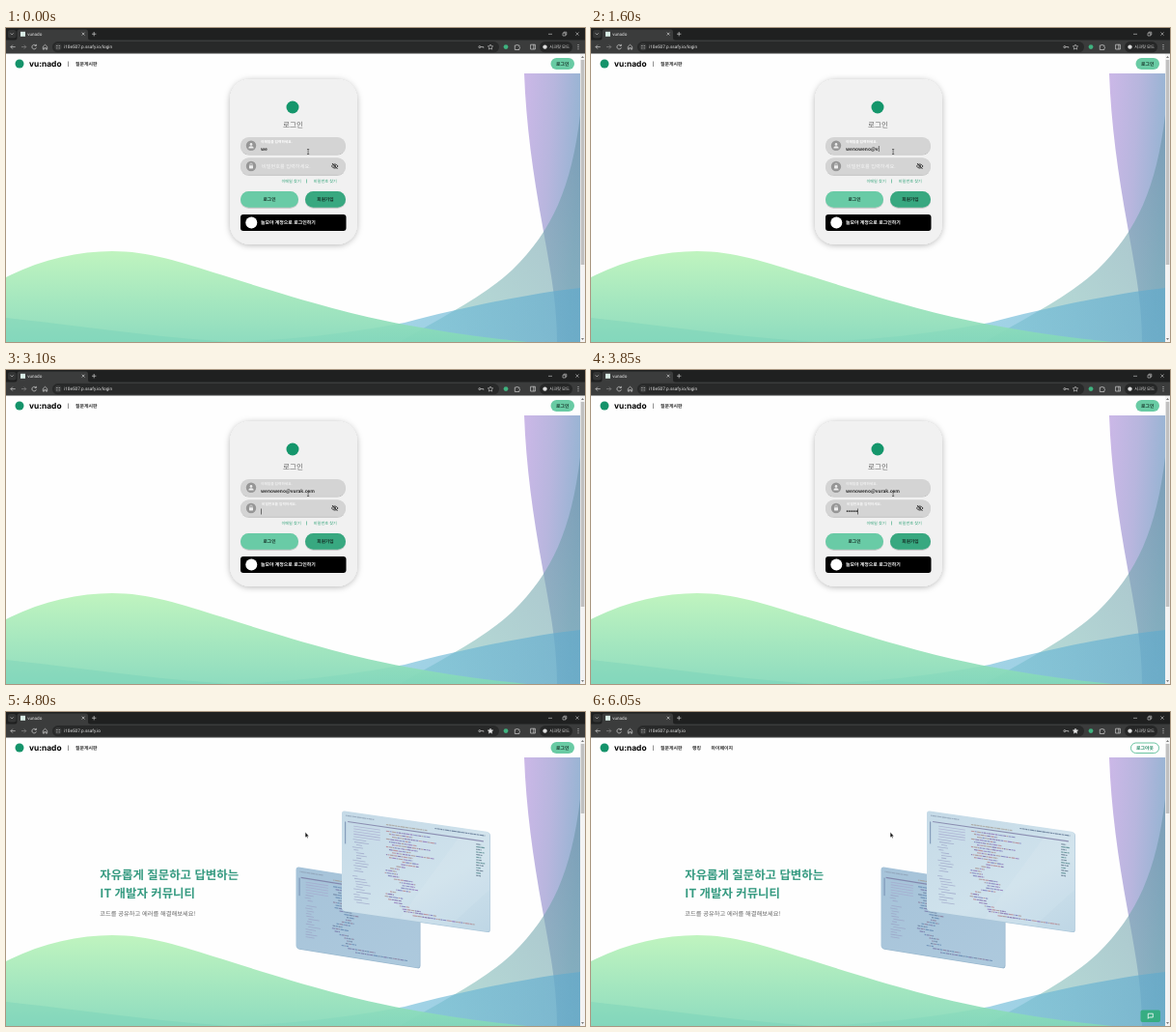
These frames come from a looping animation (600x325 px, 6.1 s). An HTML page:

```html
<!DOCTYPE html>
<html lang="ko">
<head>
<meta charset="utf-8">
<title>vunado</title>
<style>
html, body { margin: 0; width: 100%; height: 100%; overflow: hidden; background: #fefefe; }
svg { display: block; width: 600px; height: 325px; }
text { font-family: "Noto Sans CJK KR", "Noto Sans CJK JP", "Noto Sans CJK", "Noto Sans", sans-serif; text-rendering: geometricPrecision; white-space: pre; }
.b { font-weight: 700; }
.m { text-anchor: middle; }
.ui { font-family: Roboto, "Noto Sans CJK KR", "Noto Sans CJK JP", sans-serif; fill: #e6e6e6; }
.line { fill: none; stroke: #d0d0d0; stroke-width: .7; }
</style>
</head>
<body>
<svg viewBox="0 0 600 325">
  <defs>
    <linearGradient id="green" x2="0" y2="1"><stop stop-color="#b9f3b8"/><stop offset="1" stop-color="#82d8b8"/></linearGradient>
    <linearGradient id="purple" x2="1" y2=".3"><stop stop-color="#c9b4e6"/><stop offset=".5" stop-color="#b4b2dc"/><stop offset="1" stop-color="#8fb0d0"/></linearGradient>
    <linearGradient id="teal" x1="1" x2="0" y2="1"><stop stop-color="#6a8fa6"/><stop offset="1" stop-color="#8ccfc0"/></linearGradient>
    <linearGradient id="blue" x2="1" y2="0"><stop stop-color="#7fcfe6"/><stop offset="1" stop-color="#5fa9cc"/></linearGradient>
    <linearGradient id="glass" x2="1" y2="1"><stop stop-color="#c5dae7"/><stop offset=".6" stop-color="#cfe2ec"/><stop offset="1" stop-color="#bed6e5"/></linearGradient>
    <linearGradient id="glass2" x2="1" y2="1"><stop stop-color="#a6c3d9"/><stop offset="1" stop-color="#adc9dd"/></linearGradient>
    <filter id="shadow" x="-20%" y="-20%" width="140%" height="140%"><feDropShadow dx="0" dy="1" stdDeviation="3" flood-opacity=".28"/></filter>
    <filter id="soft" x="-10%" y="-30%" width="120%" height="180%"><feDropShadow dx="0" dy=".7" stdDeviation=".5" flood-opacity=".3"/></filter>
  </defs>

  <!-- page background -->
  <rect width="600" height="325" fill="#fefefe"/>
  <path d="M537 47H595V325H571C571 285 564 250 556 205C546 150 539 100 537 47Z" fill="url(#purple)" opacity=".95"/>
  <path d="M595 90C586 165 566 210 525 250C495 278 450 300 408 325H595Z" fill="url(#teal)" opacity=".6"/>
  <path d="M235 325C310 322 365 314 413 305C470 290 540 275 595 269V325Z" fill="url(#blue)" opacity=".65"/>
  <path d="M0 258C35 240 75 231 110 231C148 231 180 242 225 256C300 280 355 296 413 307C455 315 500 321 540 325H0Z" fill="url(#green)" opacity=".9"/>
  <path d="M0 300C70 307 150 320 235 325H0Z" fill="#6ccbb4" opacity=".3"/>

  <!-- site header -->
  <circle cx="14" cy="37" r="4.5" fill="#14936a"/>
  <text class="b" x="24" y="40" font-size="8.4" style="font-family:Inter,sans-serif">vu:nado</text>
  <path d="M64.5 34.5V40" stroke="#666" stroke-width=".7"/>
  <g class="b" font-size="4.9" fill="#2a2a2a">
    <text x="72" y="39.2">질문게시판</text>
    <g class="in"><text x="105" y="39.2">랭킹</text><text x="124.5" y="39.2">마이페이지</text></g>
  </g>
  <g class="out">
    <rect x="564.5" y="31" width="24.5" height="12" rx="6" fill="#69cba4"/>
    <text class="m b" x="576.7" y="39" font-size="4.8" fill="#17352a">로그인</text>
  </g>
  <g class="in">
    <rect x="559.5" y="32" width="29" height="10.5" rx="5.2" fill="#fff" stroke="#45b58a" stroke-width=".8"/>
    <text class="m b" x="574" y="39" font-size="4.9" fill="#258b66">로그아웃</text>
  </g>

  <!-- login page -->
  <g id="login">
    <rect x="232" y="53" width="132" height="171" rx="21" fill="#f1f1f1" filter="url(#shadow)"/>
    <circle cx="297" cy="82" r="6.5" fill="#14966b"/>
    <text class="m" x="297.5" y="102.8" font-size="7.6" fill="#666">로그인</text>
    <g fill="#d4d4d4" filter="url(#soft)">
      <rect x="243" y="113" width="109" height="17.5" rx="8.7"/>
      <rect x="243" y="134.3" width="109" height="17.5" rx="8.7"/>
    </g>
    <g fill="#969696"><circle cx="254" cy="121.8" r="5.2"/><circle cx="254" cy="143" r="5.2"/></g>
    <g fill="#eee">
      <circle cx="254" cy="120.4" r="1.3"/><path d="M251.3 124.4c0-2.8 5.4-2.8 5.4 0z"/>
      <rect x="252" y="142.2" width="4" height="3.2" rx=".4"/>
      <path d="M252.9 142v-1a1.1 1.1 0 0 1 2.2 0v1" fill="none" stroke="#eee" stroke-width=".6"/>
    </g>
    <text id="mailLabel" class="b" x="264" y="119" font-size="3.7" fill="#fff">이메일을 입력하세요.</text>
    <text id="mail" class="b" x="264" y="127.2" font-size="4.8" fill="#2c2c2c"></text>
    <text id="passLabel" x="265" fill="#f6f6f6">비밀번호를 입력하세요.</text>
    <text id="pass" x="264.6" y="148.3" font-size="5.7" style="font-family:'Liberation Sans',sans-serif"></text>
    <rect id="caret" width=".6" height="6" fill="#222"/>
    <g fill="none" stroke="#333" stroke-width=".9">
      <path d="M337.3 143Q340.7 138.8 344.1 143Q340.7 147.2 337.3 143ZM338 140L343.6 146"/>
      <circle cx="340.7" cy="143" r=".9"/>
    </g>
    <g font-size="4.15" fill="#35a47b">
      <text x="285.5" y="160">이메일 찾기</text><text x="318.8" y="160">비밀번호 찾기</text>
      <path d="M311.5 156.5v4" stroke="#35a47b" stroke-width=".6"/>
    </g>
    <g filter="url(#soft)">
      <rect x="243" y="169" width="60" height="16.8" rx="8.4" fill="#69cba6"/>
      <rect x="310" y="169" width="42" height="16.8" rx="8.4" fill="#38a880"/>
    </g>
    <g class="m b" font-size="4.7" fill="#142d24"><text x="273" y="179.2">로그인</text><text x="331" y="179.2">회원가입</text></g>
    <rect x="243" y="193" width="109.5" height="17" rx="3"/>
    <circle cx="254.3" cy="201.5" r="6" fill="#fff"/>
    <text class="b" x="264" y="203.3" font-size="4.9" fill="#fff">늘모아 계정으로 로그인하기</text>
    <path d="M312 125.5h1.1h1.1M313.1 125.5v5M312 130.5h2.2" fill="none" stroke="#333" stroke-width=".6"/>
  </g>

  <!-- home page -->
  <g id="home">
    <g class="b" font-size="12.4" fill="#359a80">
      <text x="97.3" y="172.8">자유롭게 질문하고 답변하는</text>
      <text x="97.3" y="191.8">IT 개발자 커뮤니티</text>
    </g>
    <text x="97.3" y="211.2" font-size="6.25" fill="#666">코드를 공유하고 에러를 해결해보세요!</text>
    <g id="back" transform="matrix(1 .16 0 1 300.5 160)">
      <rect x=".6" y=".7" width="128.4" height="84.5" rx="3" fill="#97b6cd"/>
      <rect width="128.3" height="84.5" rx="3" fill="url(#glass2)"/>
    </g>
    <g id="front" transform="matrix(1 .145 0 1 348 102)">
      <rect x=".6" y=".7" width="153.2" height="103.5" rx="3" fill="#aac6d9"/>
      <rect width="153" height="103.5" rx="3" fill="url(#glass)"/>
      <path d="M60 103L128 0H153V60L112 103Z" fill="#fff" opacity=".07"/>
    </g>
    <path d="M310.2 124.6v5.2l1.2-1 .8 1.8.8-.4-.8-1.7h1.6z" fill="#111" stroke="#fff" stroke-width=".25"/>
  </g>
  <g class="in">
    <rect x="569.5" y="308.5" width="20.5" height="12.5" rx="2" fill="#36ad82"/>
    <path d="M577.3 312.2h5v3.8h-3.8l-1.2 1.3z" fill="none" stroke="#fff" stroke-width=".8"/>
  </g>

  <!-- scrollbar -->
  <rect x="595" y="26.5" width="5" height="298.5" fill="#f3f3f3"/>
  <rect id="thumb" x="595.7" y="33" width="3.6" fill="#c0c0c0"/>
  <path d="M596 31l1.5-2 1.5 2zM596 321l1.5 2 1.5-2z" fill="#777"/>

  <!-- browser frame -->
  <rect width="600" height="13" fill="#1f2020"/>
  <path d="M0 12.5H9Q11.5 12.5 11.5 10V4Q11.5 1.5 14 1.5H82.5Q85 1.5 85 4V10Q85 12.5 87.5 12.5H600V26.5H0Z" fill="#3b3c3c"/>
  <rect x="2" y="2" width="8.5" height="8.5" rx="2.5" fill="#343535"/>
  <rect x="15" y="3.8" width="5" height="5" fill="#d9ece5"/>
  <text class="ui" x="22.3" y="8.2" font-size="4.6">vunado</text>
  <rect x="48" y="14" width="463" height="11.3" rx="5.6" fill="#282929"/>
  <circle cx="54" cy="19.6" r="3.6" fill="#3b3c3c"/>
  <text id="url" class="ui" x="60" y="21.3" font-size="4.7"></text>
  <g class="line">
    <path d="M4.7 5.4l1.5 1.5 1.5-1.5M78.7 4.7l2.8 2.8m0-2.8l-2.8 2.8M89 6.2h4.4M91.2 4v4.4"/>
    <path d="M9.7 19.6H4.9m2-2l-2 2 2 2"/>
    <path d="M16 19.6h4.8m-2-2l2 2-2 2" stroke="#888"/>
    <path d="M31 18.2a2.3 2.3 0 1 0 .4 2M31.4 16.8v1.7h-1.8"/>
    <path d="M38.3 19.3l2.2-2 2.2 2v2.8h-1.4v-1.6h-1.6v1.6h-1.4z"/>
    <path d="M52.2 18.5h1.3m1.2 0h1.2M52.2 20.8h1.2m1.2 0h1.3"/>
    <path d="M491.8 19.6h3v1.1"/><circle cx="490.8" cy="19.6" r="1"/>
    <path id="star" d="M502 17l.8 1.7 1.9.2-1.4 1.3.4 1.9-1.7-1-1.7 1 .4-1.9-1.4-1.3 1.9-.2z" stroke-width=".6"/>
    <path d="M527.3 18h1.5q.8-2 1.6 0h1.5v1.5q1.7.8 0 1.6v1.4h-4.6z"/>
    <path d="M543.6 17.2h4.8v4.8h-4.8zM546.8 17v5"/>
    <path d="M562 6.3h4M577 5.2h2.8v2.8H577zM578 5.2v-1h2.8V7h-1M590.4 4.5l3.2 3.2m0-3.2l-3.2 3.2" stroke-width=".6"/>
  </g>
  <circle cx="518" cy="19.6" r="2.4" fill="#3fb27f"/>
  <rect x="553" y="14" width="34" height="11.3" rx="5.6" fill="#262727"/>
  <circle cx="558.5" cy="19.6" r="2.2" fill="#ddd"/>
  <text class="ui" x="563.2" y="21.2" font-size="4.3">시크릿 모드</text>
  <g fill="#ddd"><circle cx="593" cy="17.5" r=".55"/><circle cx="593" cy="19.6" r=".55"/><circle cx="593" cy="21.7" r=".55"/></g>
</svg>
<script>
const LOOP = 6100, FOCUS = 3000, HOME = 4650, SIGNED = 5000;
const EMAIL = 'wenoweno@vurak.com';
const $ = id => document.getElementById(id);
const set = (el, attrs) => { for (const k in attrs) el.setAttribute(k, attrs[k]); };
const show = (el, on) => { el.style.display = on ? '' : 'none'; };

// Key press times
const mailKeys = [-600, -600, 300, 550, 800];
for (let i = 5; i < EMAIL.length; i++) mailKeys.push(950 + (i - 5) * 150);
const passKeys = Array.from({length: 8}, (_, i) => 3150 + i * 130);

// Tiny lines of code on the two glass panels
function drawCode(panel, w, h, seed, palette) {
  const rand = () => (seed = seed * 16807 % 2147483647) / 2147483647;
  const pick = () => palette[Math.floor(rand() * palette.length)];
  const bar = (x, y, len, fill, height = 1.1) => {
    const r = document.createElementNS('http://www.w3.org/2000/svg', 'rect');
    set(r, {x, y, width: len, height, fill, opacity: .75});
    panel.append(r);
  };
  const words = (x, y, end, fill) => {
    while (x < end) {
      const len = Math.min(end - x, 1 + rand() * 4);
      bar(x, y, len, fill || pick());
      x += len + .5;
    }
  };
  words(4, 4, w * .22, '#8b9cb2');
  words(w * .63, 4, w * .97, '#536a88');
  words(w * .3, 7.3, w * .58, '#a3998f');
  bar(w * .04, 10, w * .92, '#77749f', 1.2);
  bar(3, 11, 1.2, '#7089ac', h * .22);
  for (let y = 14, row = 0; y < h - 9; y += 2.7, row++) {
    const k = y / h, short = k > .42;
    // File tree, code body and minimap
    if (row < 5) bar(w * .08, y, w * .18, '#a4a6cc', .8);
    else if (rand() < .8) bar(w * (.07 + rand() * .03), y, w * (.03 + rand() * .07), '#9aa0c4', .8);
    const x = w * (short ? .35 + .06 * Math.sin(row * .7) : .3 + .02 * (row % 3));
    words(x, y, x + w * (short ? .04 + rand() * .1 : .12 + rand() * .18));
    if (k < .45) words(w * .91, y, w * (.94 + rand() * .03), row % 2 ? '#477e83' : '#576b82');
  }
  words(w * .42, h - 9, w * .64);
  words(w * .48, h - 6, w * .9);
}
drawCode($('back'), 128.3, 84.5, 91, ['#716fa3', '#5d83ad', '#877797', '#617798']);
drawCode($('front'), 153, 103.5, 37, ['#8b6bb4', '#7472b4', '#b57d88', '#765ba0', '#a58a88']);

function render(t) {
  const home = t >= HOME, signed = t >= SIGNED, onPass = t >= FOCUS;
  show($('login'), !home);
  show($('home'), home);
  document.querySelectorAll('.in').forEach(e => show(e, signed));
  document.querySelectorAll('.out').forEach(e => show(e, !signed));
  $('url').textContent = 'i10e507.p.ssafy.io' + (home ? '' : '/login');
  set($('star'), {fill: home ? '#e8e8e8' : 'none'});
  set($('thumb'), {height: home ? 72 : 212});
  if (home) return;

  const typed = keys => keys.filter(k => k <= t);
  const mail = typed(mailKeys), pass = typed(passKeys);
  $('mail').textContent = EMAIL.slice(0, mail.length);
  $('pass').textContent = '•'.repeat(pass.length);
  set($('mailLabel'), {opacity: onPass ? .65 : 1});
  set($('passLabel'), onPass
    ? {y: 140.3, 'font-size': 3.7, 'font-weight': 700}
    : {y: 145, 'font-size': 5.2, 'font-weight': 400});

  // The caret restarts its blink at each key press
  const field = onPass ? $('pass') : $('mail');
  const last = onPass ? Math.max(FOCUS, ...pass) : Math.max(...mail);
  const width = field.textContent ? field.getComputedTextLength() : 0;
  set($('caret'), {x: 264.4 + width, y: onPass ? 143.5 : 122});
  show($('caret'), (t - last) % 1060 < 530);
}

const start = performance.now();
function tick() {
  render((performance.now() - start) % LOOP);
  requestAnimationFrame(tick);
}
tick();
</script>
</body>
</html>
```
